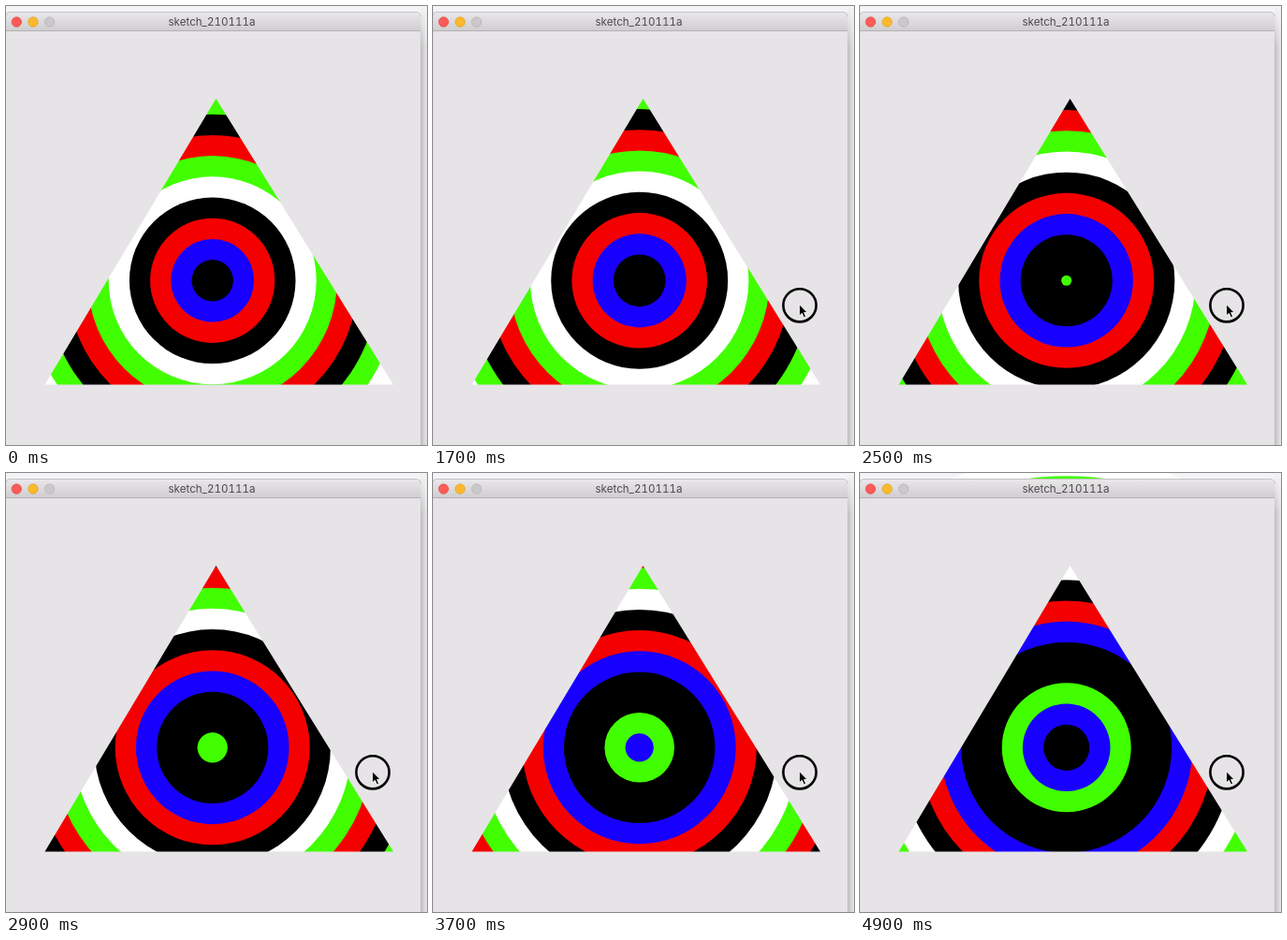
An HTML page for the animation above (5000 ms loop, 450 by 469 pixels).

```html
<!DOCTYPE html>
<html lang="en">
<head>
<meta charset="utf-8">
<title>Rings in a triangle</title>
<style>
html, body { margin: 0; width: 100%; height: 100%; overflow: hidden; background: #f4f3f5; }
svg { display: block; width: 450px; height: 469px; }
text { font: 11.6px Inter, Roboto, sans-serif; font-variant-numeric: tabular-nums; fill: #4a484a; text-anchor: middle; }
</style>
</head>
<body>
<svg viewBox="0 0 450 469">
  <defs>
    <linearGradient id="bar" x2="0" y2="1">
      <stop stop-color="#e9e7e9"/><stop offset="1" stop-color="#d0ced0"/>
    </linearGradient>
    <linearGradient id="shade">
      <stop stop-color="#bebcbe"/><stop offset="1" stop-color="#e8e6e8"/>
    </linearGradient>
    <linearGradient id="fade" x2="0" y2="1">
      <stop stop-color="#f4f3f5"/><stop offset="1" stop-color="#f4f3f5" stop-opacity="0"/>
    </linearGradient>
  </defs>

  <g id="rings"><path fill="#fff" d="M30 90h395v320H30z"/></g>

  <!-- The window body covers the rings except for a triangular hole -->
  <path fill="#e6e4e6" fill-rule="evenodd" d="M0 26h443v443H0zM224.5 99L414 404.5H41.5Z"/>
  <path fill="url(#shade)" d="M443 0h7v469h-7z"/>
  <path fill="url(#fade)" d="M443 0h7v45h-7z"/>
  <path fill="url(#bar)" d="M0 26V10q0-3 4-3h434q5 0 5 5v14z"/>
  <path fill="none" stroke="#c4c2c4" d="M0 10q0-3.5 4-3.5h434q5 0 5 5"/>
  <path stroke="#b3b1b3" d="M0 26.5h443"/>
  <circle cx="11.3" cy="17" r="5.2" fill="#fc5b57" stroke="#e2443f" stroke-width=".7"/>
  <circle cx="29" cy="17" r="5.2" fill="#fdb92c" stroke="#dfa023" stroke-width=".7"/>
  <circle cx="46.6" cy="17" r="5.2" fill="#cac8ca" stroke="#b4b2b4" stroke-width=".7"/>
  <text x="220" y="21">sketch_210111a</text>

  <circle id="click" cx="392" cy="319.8" r="17.6" fill="none" stroke="#000" stroke-width="2.6"/>
  <path id="cursor" d="M0 0V14.2L3.3 11.2 5.7 16.5 8.2 15.4 5.9 10.3H10Z" stroke="#fff" stroke-width="1"/>
</svg>
<script>
const $ = id => document.getElementById(id);
const LOOP = 5000, STEP = 100, GAP = 22.2, GROWTH = 2.644, HEAD_START = 0.9;
const black = '#000', blue = '#1800ff', red = '#f50000', green = '#41ff00', white = '#fff';

// Outermost first; rings with a negative base emerge from the centre.
const colors = [white, green, black, red, green, white, black, red, blue, black,
                black, green, blue, black];
const rings = colors.map((fill, i) => {
  const c = document.createElementNS('http://www.w3.org/2000/svg', 'circle');
  c.setAttribute('cx', 220.7);
  c.setAttribute('cy', 293.3);
  c.setAttribute('fill', fill);
  $('rings').append(c);
  const base = (10 - i) * GAP;
  return { c, base: base < 0 ? base + HEAD_START : base };
});

// Cursor path: time, x, y
const path = [[500, 446, 430], [600, 440, 424], [800, 403.7, 379.8],
              [1000, 396, 340], [1200, 391.6, 318.8], [LOOP, 391.6, 318.8]];

function cursorAt(t) {
  const i = Math.max(1, path.findIndex(p => p[0] >= t));
  const [t0, x0, y0] = path[i - 1], [t1, x1, y1] = path[i];
  const k = (t - t0) / (t1 - t0);
  return [x0 + (x1 - x0) * k, y0 + (y1 - y0) * k];
}

function show(id, on) { $(id).style.display = on ? '' : 'none'; }

function draw(now) {
  const t = Math.floor(now % LOOP / STEP) * STEP;
  const grow = t < 1500 ? 0 : 5.7 + (t - 1700) / STEP * GROWTH;
  for (const { c, base } of rings) c.setAttribute('r', Math.max(0, base + grow));

  const pressed = t >= 1400;
  show('click', pressed);
  show('cursor', t >= 500);
  const [x, y] = cursorAt(t);
  $('cursor').setAttribute('transform', `translate(${x} ${y}) scale(${pressed ? .85 : 1})`);
}

const start = performance.now();
function tick() {
  draw(performance.now() - start);
  requestAnimationFrame(tick);
}
tick();
</script>
</body>
</html>
```
